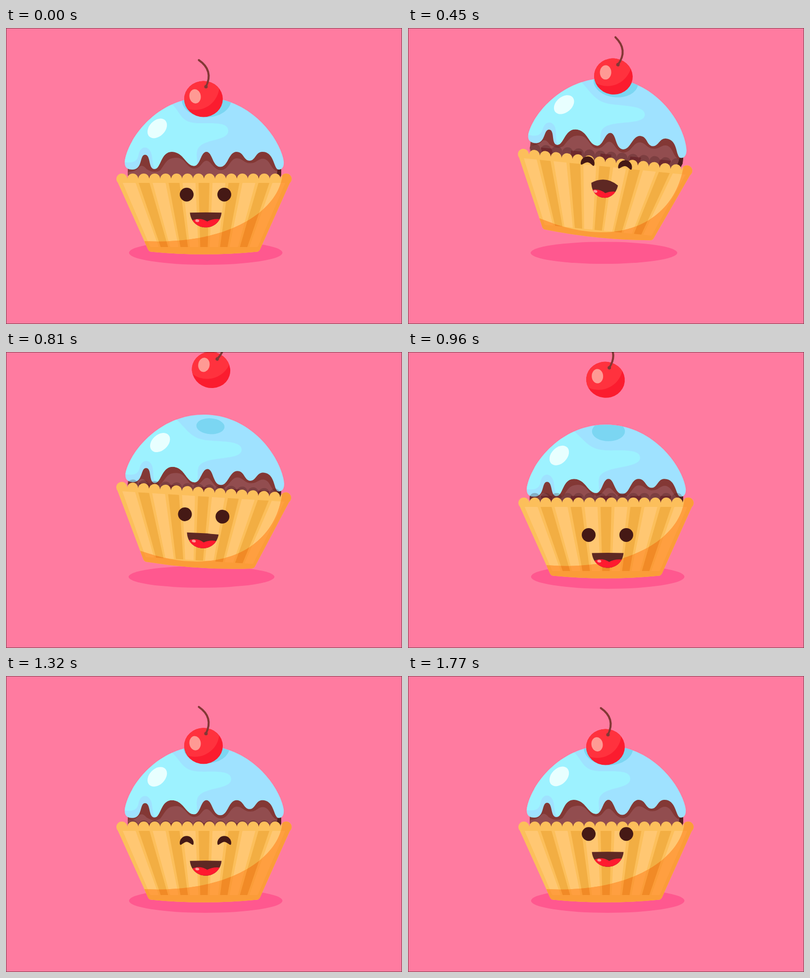
Recreate the animation shown at these times as an HTML page. Size 800 px wide and 600 px high, loop 1.8 s.

```html
<!DOCTYPE html>
<html lang="en">
<head>
<meta charset="utf-8">
<title>Jumping cupcake</title>
<style>
  html, body { margin: 0; width: 100%; height: 100%; overflow: hidden; background: #ff7ba0; }
  svg { display: block; width: 100vw; height: 100vh; }
</style>
</head>
<body>
<svg viewBox="0 0 800 600" preserveAspectRatio="none">
  <defs>
    <path id="icing" d="M240 270C246 225 305 141 400 141S554 225 561 270C562 281 558 287 551 287C540 287 543 251 518 251
      C504 251 504 269 492 269C480 269 480 251 466 251C449 251 449 281.500 433 281.500C417 281.500 417 251 405 251
      C393 251 393 279.500 380 279.500C363 279.500 359 251 335 251C312 251 313 286 300 286C287 286 293 257 281 257
      C269 257 277 287 255 287C244 287 239 281 240 270Z"/>
    <clipPath id="icingClip"><use href="#icing"/></clipPath>
    <clipPath id="cherryClip"><ellipse cx="399" cy="144" rx="39" ry="36.500"/></clipPath>
    <clipPath id="shadeClip"><path id="shade"/></clipPath>
    <clipPath id="mouthClip"><path id="mouthHole"/></clipPath>
  </defs>
  <rect width="800" height="600" fill="#ff7ba0"/>
  <ellipse id="floor" fill="#ff588f"/>

  <g id="cupcake">
    <g id="cake">
      <path fill="#833835" d="M268 235L246 285V298L290 410H510L556 298V285L535 235Z"/>
      <path fill="#924d4f" d="M247 300V292Q262 292 270 281Q276 276 284 286Q300 296 312 288C324 272 325 263 345 263
        C362 263 366 285 380 285C394 285 396 269 405 269C414 269 420 288 434 288C450 288 452 265 466 264
        C478 264 482 275 494 274C506 274 510 264 520 265C534 267 534 285 548 291L550 310L510 410H290Z"/>
      <path fill="#53201f" d="M556 286V298L531 358L508 362Q543 328 549 286Z"/>
      <use href="#icing" fill="#9fe2ff"/>
      <g clip-path="url(#icingClip)">
        <path id="gloss" fill="#9df2ff"/>
        <ellipse id="dent" cx="405" fill="#7bd6f2"/>
      </g>
      <ellipse rx="23" ry="16" transform="translate(305.500 203.500) rotate(-46)" fill="#e8ffff"/>
      <g id="cherry">
        <ellipse cx="399" cy="144" rx="39" ry="36.500" fill="#fb1c2f"/>
        <circle cx="382" cy="117" r="49" fill="#ff323e" clip-path="url(#cherryClip)"/>
        <ellipse rx="11.500" ry="14.500" transform="translate(382 138.500) rotate(-8)" fill="#ff9a94"/>
        <path d="M404 119Q420 86 389.500 65" fill="none" stroke="#833835" stroke-width="4" stroke-linecap="round"/>
        <circle cx="404" cy="119" r="3.500" fill="#833835"/>
      </g>
    </g>

    <g id="innerShade">
      <path id="innerBody" fill="#3a1418" opacity=".25"/>
      <path id="innerStripes" fill="#5c0f14" opacity=".45"/>
    </g>

    <g id="cup"></g>

    <g id="face" fill="#451915">
      <path id="eyeL"/>
      <path id="eyeR"/>
      <g id="mouthGroup">
        <path id="mouth" fill="#5e2823"/>
        <g clip-path="url(#mouthClip)">
          <path fill="#ff1a2f" d="M-30 17Q-13 8 3 18Q16 11 32 14V42H-30Z"/>
          <ellipse cx="-17" cy="16.500" rx="4" ry="2.700" transform="rotate(10 -17 16)" fill="#ff9a94"/>
        </g>
      </g>
    </g>
  </g>
  <rect x=".5" y=".5" width="799" height="599" fill="none" stroke="#000" stroke-opacity=".5"/>
</svg>

<script>
const LOOP = 1800;
const el = id => document.getElementById(id);
const set = (id, attrs) => {
  for (const name in attrs) el(id).setAttribute(name, attrs[name]);
};

const linear = u => u;
const easeInOut = u => u < .5 ? 4 * u ** 3 : 1 - 4 * (1 - u) ** 3;

// keys: time, value, time, value, ...
function track(t, keys, ease = easeInOut) {
  if (t <= keys[0]) return keys[1];
  for (let i = 2; i < keys.length; i += 2) {
    if (t < keys[i]) {
      const u = (t - keys[i - 2]) / (keys[i] - keys[i - 2]);
      return keys[i - 1] + (keys[i + 1] - keys[i - 1]) * ease(u);
    }
  }
  return keys[keys.length - 1];
}

// Tapered bands spread around the middle of the cup.
function bands(positions, topWidth, bottomWidth, y = 314) {
  return positions.map(k => {
    const top = 400 + 60.5 * k, bottom = 400 + 40 * k;
    return `M${top - topWidth / 2} ${y}h${topWidth}L${bottom + bottomWidth / 2} 444h${-bottomWidth}Z`;
  }).join('');
}

// Circles wind the same way as the bodies they join.
function scallops(first, last) {
  let d = '';
  for (let i = first; i <= last; i++) {
    d += `M${223 + i * 22.13} 306a11 11 0 0 0 22 0a11 11 0 0 0 -22 0Z`;
  }
  return d;
}

const darkSlots = [-2, -1, 0, 1, 2];
const darkBands = bands(darkSlots, 22, 15);
const lightBands = bands([-2.5, -1.5, -.5, .5, 1.5, 2.5], 26, 17);
const cupBody = scallops(0, 15) +
  'M223.500 308L287 449Q289 453 293 453.500Q400 464 507 453.500Q511 453 513 449L576 308L566 305H234Z';
const cupLayers = (body, light, dark) =>
  `<path d="${cupBody}" fill="${body}"/><path d="${lightBands}" fill="${light}"/><path d="${darkBands}" fill="${dark}"/>`;

el('cup').innerHTML = cupLayers('#fcbf5b', '#ffc772', '#f2ae43') +
  `<g clip-path="url(#shadeClip)">${cupLayers('#fb9c38', '#ff9f40', '#f18a26')}</g>`;
set('innerBody', { d: scallops(1, 14) + 'M246 306L300 440H500L553 306Z' });
set('innerStripes', { d: bands(darkSlots, 22, 15, 301) });

function eyePath(x, closed) {
  const side = 7.7 + 2.3 * closed, low = 14 - 16 * closed;
  return `M${x - 14} 337a14 14 0 0 1 28 0c0 ${side} -7 ${low} -14 ${low}s-14 ${side - low} -14 ${-low}Z`;
}

function mouthPath(laugh) {
  const w = 32 - 5 * laugh;
  return `M${-w} 0Q0 ${-1 - 17 * laugh} ${w} 0C${w - 4} ${40 - 3 * laugh} ${4 - w} ${40 - 3 * laugh} ${-w} 0Z`;
}

function glossPath(stretch) {
  const tip = 449 + stretch, bay = 378 + .6 * stretch;
  return `M330 150C352 166 ${bay - 28} 188 ${bay} 192C${bay + 22} 196 ${tip} 186 ${tip} 208
    C${tip} 232 392 222 386 250C383 262 390 270 382 285H304C298 285 297 276 295 262
    C293 238 272 236 268 256C266 270 258 274 240 272H220V130Z`;
}

function draw(t) {
  const jump = track(t, [326, 0, 580, 1, 980, 0]);
  const shrink = track(t, [377, 0, 590, 1, 600, 1, 930, 0]);
  set('floor', {
    cx: 403.5 - 45.5 * shrink, cy: 455.5 + 1.5 * shrink,
    rx: 155 - 41 * shrink, ry: 24.5 - 13 * shrink
  });

  set('cupcake', {
    transform: `translate(${399.5 - 10 * jump ** 2.4} ${305 - 70 * jump}) rotate(${12.2 * jump}) translate(-399.5 -305)`
  });
  const bulge = track(t, [300, 0, 480, 1, 700, 1, 1080, 0]);
  set('shade', {
    d: `M556 285L558 300C${550 + 2 * bulge} ${370 + 37 * bulge} 450 ${440 + 45 * bulge} 280 432L270 480H600V285Z`
  });

  const lift = track(t, [375, 0, 620, -48.5, 800, 7, 1170, 5, 1400, 0]);
  const inner = track(t, [330, 0, 620, -42, 830, -6, 1100, -13, 1180, -13, 1400, 0]);
  set('cake', { transform: `translate(0 ${lift})` });
  set('innerShade', { transform: `translate(0 ${inner})` });

  const toss = track(t, [310, 0, 830, 94, 1010, 94, 1400, 0]);
  const tilt = track(t, [330, 0, 600, 11, 810, 14, 1100, 0]);
  set('cherry', { transform: `translate(0 ${-toss}) rotate(${tilt} 399 144)` });

  const mix = (rest, a, b, c, d) =>
    track(t, [330, rest, 450, a, 600, b, 810, c, 1170, d, 1400, rest], linear);
  set('dent', {
    cy: mix(145, 148, 172, 164, 141),
    rx: mix(50, 45, 30, 28.5, 40),
    ry: mix(36, 30, 18.5, 16, 26)
  });
  set('gloss', { d: glossPath(mix(0, 21, 29, 22, 17)) });

  const look = track(t, [-89, -24, 101, 34, 270, 34, 590, -55, 600, -55, 937, 34, 1180, 34, 1450, -24, 1711, -24, 1901, 34]);
  const closed = track(t, [180, 0, 300, 1, 490, 1, 570, 0, 1132, 0, 1215, 1, 1630, 1, 1750, 0]);
  const laugh = track(t, [330, 0, 440, 1, 460, 1, 570, 0]);
  set('face', { transform: `translate(0 ${look})` });
  set('eyeL', { d: eyePath(365, closed) });
  set('eyeR', { d: eyePath(441, closed) });
  set('mouthGroup', { transform: `translate(403.5 ${373.5 + 2 * laugh})` });
  const mouth = { d: mouthPath(laugh) };
  set('mouth', mouth);
  set('mouthHole', mouth);
}

const start = performance.now();
function tick() {
  draw((performance.now() - start) % LOOP);
  requestAnimationFrame(tick);
}
tick();
</script>
</body>
</html>
```
